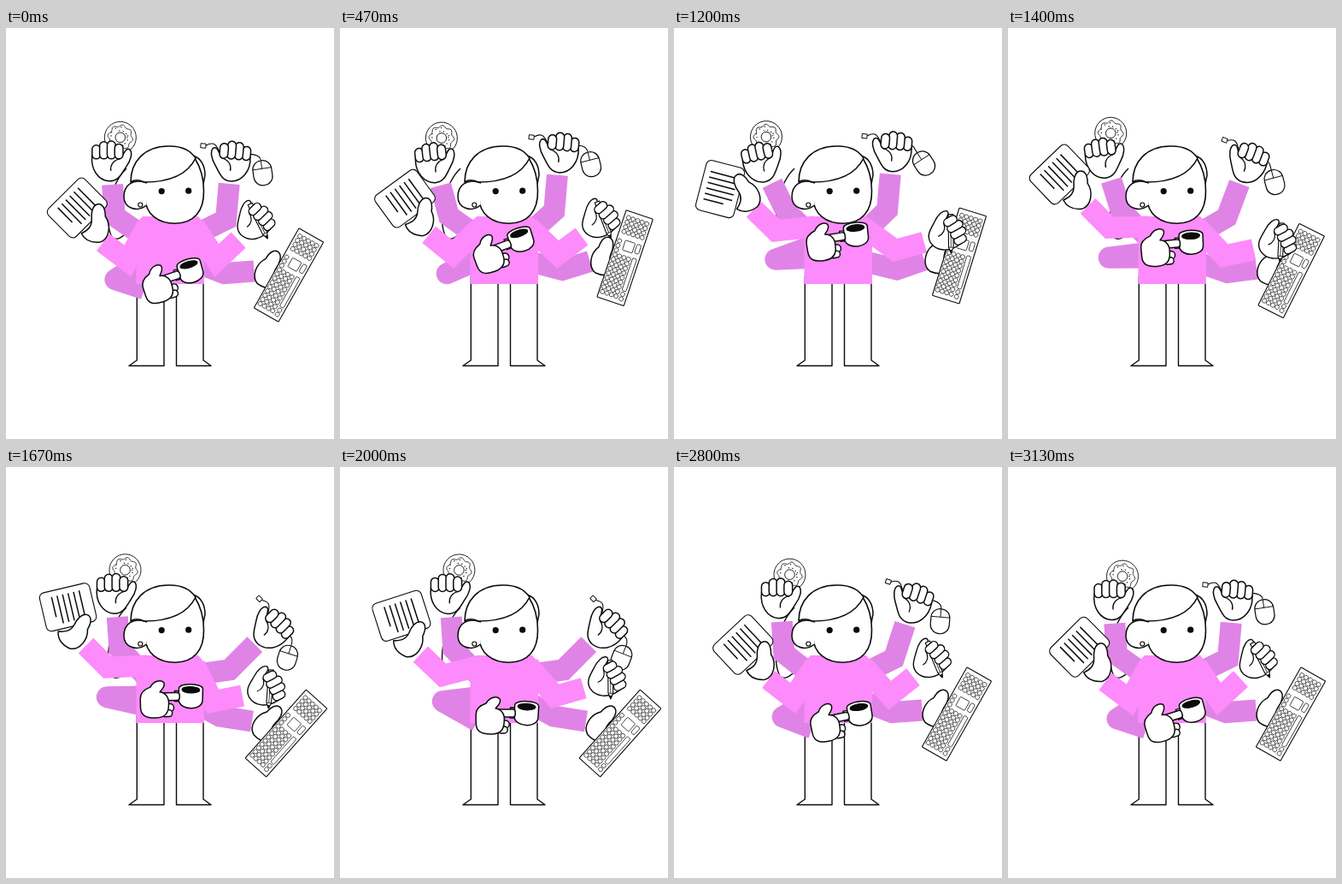
Write an HTML page with a canvas that moves like this. It is 384 by 480 pixels and loops after 3.19 s.

```html
<!DOCTYPE html>
<html lang="en">
<head>
<meta charset="utf-8">
<title>Many-armed multitasker</title>
<style>
html, body { margin: 0; width: 100%; height: 100%; overflow: hidden; background: #fff; }
canvas { display: block; width: 384px; height: 480px; }
</style>
</head>
<body>
<canvas id="stage"></canvas>
<script>
const W = 384, H = 480, LOOP = 3190, STEP = 200 / 3, STEPS = 48;
const PINK = '#fd8bfb', PLUM = '#e083e6', INK = '#0b0b0b';
const DEG = Math.PI / 180;

const canvas = document.getElementById('stage');
const ctx = canvas.getContext('2d');
const dpr = window.devicePixelRatio || 1;
canvas.width = W * dpr;
canvas.height = H * dpr;

let now = 0; // current step of the loop

// Timing: a cosine that peaks at a step, and an eased 0-1-0 pulse that may wrap.
const wave = peak => Math.cos((now - peak) / STEPS * Math.PI * 2);
const ease = (t, a, b) => (1 - Math.cos(Math.PI * Math.min(1, Math.max(0, (t - a) / (b - a))))) / 2;
const bump = (t, a, b, c, d) => ease(t, a, b) - ease(t, c, d);
const pulse = (a, b, c, d) => bump(now, a, b, c, d) + bump(now + STEPS, a, b, c, d);

const polar = ([x, y], deg, len) => [x + len * Math.cos(deg * DEG), y + len * Math.sin(deg * DEG)];
const svg = d => new Path2D(d);

function ink(path, width = 1.5, fill = '#fff') {
  if (fill) { ctx.fillStyle = fill; ctx.fill(path); }
  ctx.strokeStyle = INK;
  ctx.lineWidth = width;
  ctx.stroke(path);
}

function box(x, y, w, h, r) {
  const p = new Path2D();
  p.roundRect(x, y, w, h, r);
  return p;
}

function oval(x, y, rx, ry = rx) {
  const p = new Path2D();
  p.ellipse(x, y, rx, ry, 0, 0, Math.PI * 2);
  return p;
}

function place([x, y], turn, draw, flip = 1, size = 1) {
  ctx.save();
  ctx.translate(x, y);
  ctx.rotate(turn);
  ctx.scale(flip * size, size);
  draw();
  ctx.restore();
}

function sleeve(points, color, join = 'miter') {
  ctx.strokeStyle = color;
  ctx.lineWidth = 25;
  ctx.lineJoin = join;
  ctx.beginPath();
  points.forEach(p => ctx.lineTo(...p));
  ctx.stroke();
  ctx.lineJoin = 'round';
}

const palm = svg('M-22 -8C-24 8 -15 21 -2 22C9 22 12 14 18 5C23 -2 26 -11 22 -15C17 -18 15 -8 10 -4L8 -14H-19Z');
const crease = svg('M10 -4C2 -2 -1 4 0 10');
const grip = svg('M2 -22C8 -24 12 -18 12 -8C19 2 17 18 6 22C-4 23 -12 20 -16 12C-8 8 -4 4 -4 -4C-5 -12 -3 -20 2 -22Z');
const fist = svg('M-20 -2C-20 -10 -14 -13 -8 -15C-4 -22 4 -24 8 -20C10 -15 5 -12 3 -9C10 -8 14 -2 13 6C13 16 8 21 -2 21C-14 21 -20 18 -20 8Z');

function hand(held = () => {}) {
  ink(palm);
  ink(crease, 1.3, null);
  held();
  for (let i = 0; i < 4; i++) {
    const rise = 5 * Math.sin(i * 0.95);
    ink(box(-22 + 8.8 * i, -20 - rise, 9.8, 16 + rise, 4.9));
  }
}

function donut() {
  ink(oval(11, -29, 18.5), 0.9);
  const icing = new Path2D();
  for (let i = 0; i <= 72; i++) {
    const a = i * Math.PI / 36, r = 13.7 + 1.2 * Math.sin(a * 8);
    icing.lineTo(11 + r * Math.cos(a), -29 + r * Math.sin(a));
  }
  ink(icing, 0.8);
  ink(oval(11, -29, 5.8), 0.9);
  ctx.fillStyle = INK;
  for (let i = 0; i < 16; i++) {
    const [x, y] = polar([11, -29], i * 137.5, 8 + (i * 7 % 5));
    ctx.fillRect(x - 0.6, y - 0.6, 1.2, 1.2);
  }
}

function mouseSet(at, turn, tilt) {
  const spot = (x, y) => polar(at, turn / DEG + Math.atan2(y, x) / DEG, Math.hypot(x, y));
  const body = spot(38, 9), top = polar(body, tilt / DEG - 90, 15);
  const cable = new Path2D();
  cable.moveTo(...spot(12, -10));
  cable.bezierCurveTo(...spot(25, -13), ...polar(top, tilt / DEG - 90, 7), ...top);
  ink(cable, 1.1, null);
  place(body, tilt, () => {
    ink(box(-11, -14.5, 22, 29, 10.5), 1.2);
    ink(svg('M-11 -5H11M0 -14.5V-5'), 0.9, null);
  });
  place(at, turn, () => {
    ink(svg('M-31 -17C-24 -22 -20 -21 -15 -12L-8 -6'), 1.1, null);
    ink(box(-37, -19, 6, 5, 0.5), 1);
  });
  place(at, turn, hand, -1);
}

function pencil() {
  ink(svg('M-3 -23H3V18L0 25L-3 18Z'), 1.2);
  ink(svg('M-3 -18H3M0 -18V18M-3 18H3'), 0.8, null);
  ink(svg('M-1.4 21.5L0 25L1.4 21.5Z'), 1, INK);
}

function keyGrid(x, y, cols, rows) {
  for (let r = 0; r < rows; r++)
    for (let c = 0; c < cols; c++) ink(oval(x + c * 5.6, y + r * 5.7, 2.5), 0.65);
}

function keyboard() {
  ink(box(-16.5, -53.5, 33, 107, 0.8), 1.1);
  keyGrid(-11, -46, 5, 4);
  ink(box(-6, -20, 12, 12, 1), 0.7);
  ink(box(8.5, -20, 5, 11, 2), 0.7);
  keyGrid(-12.5, -17, 1, 3);
  keyGrid(-12.5, 0, 4, 9);
  ink(box(8.6, -3, 5, 40, 1.5), 0.7);
  keyGrid(11, 41, 1, 2);
}

function paper() {
  ink(box(-23, -30, 46, 60, 6), 1.1);
  for (let i = 0; i < 6; i++)
    ink(svg(`M-16 ${-17 + i * 6.6}H${i === 5 ? 8 : 17}`), 1.5, null);
}

function mugInHand() {
  place([39, -3], 0.05, () => {
    ink(svg('M-12 -6H-19V6H-11'), 1.4);
    ink(svg('M-14 -9C-14 -16 14 -16 14 -9V4C14 17 -13 17 -14 4Z'), 1.5);
    ink(oval(0, -7.8, 10.5, 3.8), 1, INK);
  });
  ink(box(6, 5, 13, 9, 4.5));
  ink(box(5, 12, 12, 8, 4));
  ink(box(5, -8, 21, 9, 3));
  ink(fist);
}

function legs() {
  ink(svg('M153.3 290V388L144 394.5H185V290Z'), 1.4);
  ink(svg('M199.5 290V394.5H240L231 388V290Z'), 1.4);
}

function head() {
  ink(svg('M219 149C229 152 233 162 233 172L231 182L220 180Z'), 1.5);
  ink(svg('M163 180V198C163 218 179 228.3 198 228.3C220 228 232 214 231.5 190C231.5 174 228 163 221 152Z'), 1.6);
  ink(svg('M165 181C148 175 138 184 138 197C138 210 153 216 164.5 207'));
  ink(svg('M146 180C146 156 162 138.3 190 138C207 137.5 216 143 222 152C212 172 190 180 162 180C155 177 150 177 146 180Z'), 1.6);
  ink(oval(157.3, 206.5, 2.5), 1.2);
  ctx.fillStyle = INK;
  ctx.fill(oval(182.2, 190.6, 3.6));
  ctx.fill(oval(213.7, 190.2, 3.6));
}

function pose() {
  const sway = wave(22.5), turn = wave(0);
  const p = {};

  const lean = pulse(0, 14, 18, 25), bob = wave(27);
  const tilt = -94 - 22 * lean;
  p.donutElbow = [130 + 3 * bob, 216 - 4 * bob];
  p.donutEnd = polar(p.donutElbow, tilt, 37);
  p.donutHand = polar(p.donutElbow, tilt, 63);
  p.donutTurn = -0.22 * lean;

  const drop = pulse(18, 25, 34, 47);
  const sag = (pulse(18, 25, 35, 42) + pulse(18, 25, 48, 57)) / 2;
  const reach = 5 + 40 * drop;
  p.mouseElbow = polar([218, 243], -44 + 36 * sag, 44);
  p.mouseEnd = polar(p.mouseElbow, reach - 90, 42);
  p.mouseHand = polar(p.mouseElbow, reach - 90, 67);
  p.mouseTurn = reach * DEG;
  p.mouseTilt = -0.4 + 0.95 * drop + 0.25 * turn;

  p.keysElbow = [261 - 11 * sag, 282 + 9 * sag];
  p.keysEnd = [293 - 5 * sag, 271 + 26 * sag];
  p.keysHand = [312 - 3 * sag, 265 + 35 * sag];
  p.keyboard = [334 - 6 * sag, 266 + 45 * sag];
  p.keysTurn = 0.3 + 0.43 * sag;

  const lift = pulse(0, 11, 16, 35);
  p.mugElbow = [123 - 5 * sway, 281 - 13 * sway];
  p.mugHand = [180 - 5 * lift, 299 - 50 * lift];
  p.mugEnd = [p.mugHand[0] - 18, p.mugHand[1] + 6];
  p.mugTurn = -0.18 + 0.18 * wave(29);

  const flick = 0.55 * pulse(0, 20, 25, 45) - 1.07 * pulse(9, 17, 18, 24);
  p.paperElbow = polar([165, 232], 149 - -30 * sway, 46);
  p.paperEnd = polar(p.paperElbow, 221 + 4 * sway, 36);
  p.paperHand = [p.paperElbow[0] - 38, p.paperElbow[1] - 44];
  p.paperTurn = flick;

  const bend = 36 + 27 * pulse(18, 25, 26, 34) + 21 * pulse(35, 48, 48, 60);
  const aim = -27 - 16 * turn;
  p.pencilElbow = polar([221, 232], bend, 47);
  p.pencilEnd = polar(p.pencilElbow, aim, 35);
  p.pencilHand = polar(p.pencilElbow, aim - 4, 62);
  p.pencilTurn = 0.95 - 0.15 * turn;
  p.pencilTilt = -0.2 - 0.27 * turn;
  return p;
}

function draw() {
  const p = pose();
  ctx.setTransform(dpr, 0, 0, dpr, 0, 0);
  ctx.fillStyle = '#fff';
  ctx.fillRect(0, 0, W, H);
  ctx.lineJoin = 'round';

  ink(svg('M141 164C122 182 114 225 124 244C129 250 137 243 143 238'), 1.4, null);
  legs();
  sleeve([p.donutEnd, p.donutElbow, [165, 246]], PLUM);
  sleeve([p.mouseEnd, p.mouseElbow, [218, 243]], PLUM);
  sleeve([p.keysEnd, p.keysElbow, [212, 270]], PLUM);
  sleeve([p.mugEnd, p.mugElbow, [168, 268]], PLUM, 'round');

  ctx.fillStyle = PINK;
  ctx.fill(svg('M160 220H225L232 228V299H152.5V228Z'));
  sleeve([p.paperEnd, p.paperElbow, [165, 232]], PINK);
  sleeve([p.pencilEnd, p.pencilElbow, [221, 232]], PINK);
  head();

  place(p.donutHand, p.donutTurn, () => { donut(); hand(); });
  mouseSet(p.mouseHand, p.mouseTurn, p.mouseTilt);
  place(p.keysHand, p.keysTurn, () => ink(grip), -1);
  place(p.keyboard, p.keysTurn, keyboard);
  // The hand is mirrored, so the pencil's angle is undone inside it.
  place(p.pencilHand, p.pencilTurn, () => hand(() =>
    place([-4, -6], p.pencilTurn - p.pencilTilt, pencil)), -1, 0.94);
  place(p.paperHand, p.paperTurn, () => {
    place([-21, -18], 0.79, paper);
    ink(grip);
  });
  place(p.mugHand, p.mugTurn, mugInHand);
}

const start = performance.now();
function tick() {
  const t = (performance.now() - start) % LOOP;
  now = Math.min(STEPS - 1, Math.floor((t + 3.4) / STEP));
  draw();
  requestAnimationFrame(tick);
}
tick();
</script>
</body>
</html>
```
